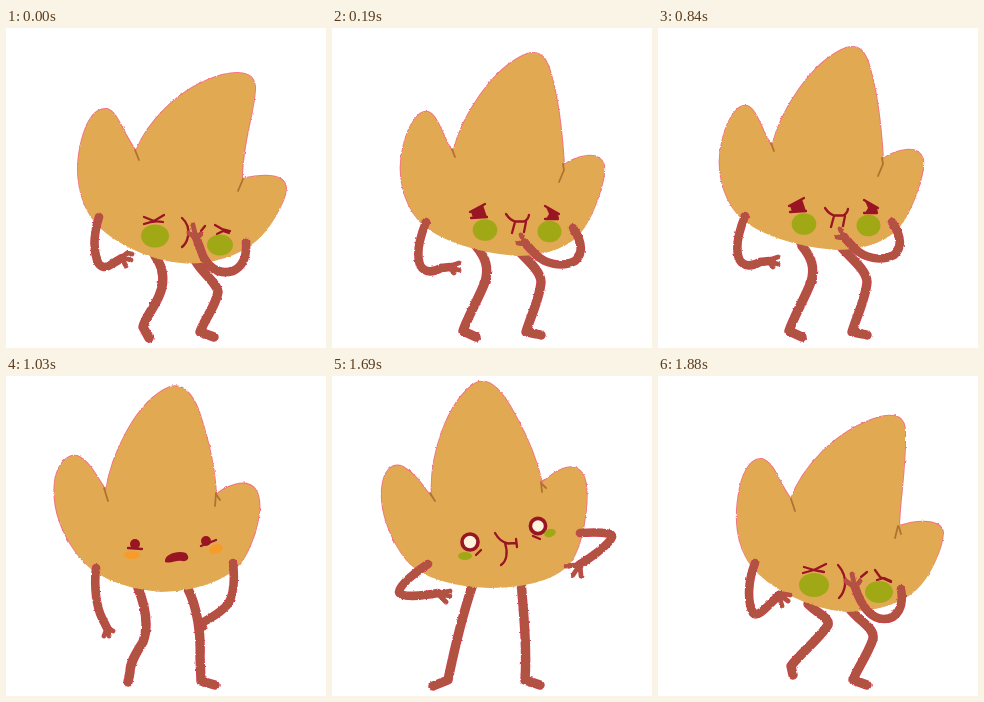
Write an HTML page that moves like this. It is 320x320 px and loops after 2070 ms.

```html
<!DOCTYPE html>
<html lang="en">
<head>
<meta charset="utf-8">
<title>Queasy leaf</title>
<style>
  html, body { margin: 0; width: 100%; height: 100%; overflow: hidden; background: #fff; }
  svg { display: block; width: 100vw; height: 100vh; }
  path { fill: none; stroke-linecap: round; stroke-linejoin: round; }
  .rim { stroke: url(#blush); stroke-width: 2; filter: url(#rough); }
  .skin { fill: #e2a953; }
  .crease { stroke: #b0722f; stroke-width: 1.8; }
  .limb { stroke-width: 6.6; stroke: #b05340; filter: url(#soft); }
  .limb.edge { stroke-width: 8.6; stroke: #c8434e; filter: url(#rough); }
  .leg { stroke-width: 7.4; stroke: #b05340; filter: url(#soft); }
  .leg.edge { stroke-width: 9.4; stroke: #c8434e; filter: url(#rough); }
  .hand { stroke-width: 3.4; stroke: #b05340; filter: url(#soft); }
  .hand.edge { stroke-width: 4.8; stroke: #c8434e; filter: url(#rough); }
  .ink { stroke: #991523; stroke-width: 2.3; }
  .blot { fill: #991523; }
  .ring { fill: #fdf3dd; stroke: #991523; stroke-width: 3.6; }
  .sick { fill: #a1a816; }
  .warm { fill: #f79c28; }

  .pose, .top { animation: 2070ms step-end infinite; }
  .pose { opacity: 0; }
  .squeeze { animation-name: squeeze; }
  .hold { animation-name: hold; }
  .hold .top { animation-name: sway; }
  .relief { animation-name: relief; }
  .calm { animation-name: calm; }
  .gag { animation-name: gag; }
  .heave { animation-name: heave; }
  @keyframes squeeze { 0% { opacity: 1 } 9.178%, 100% { opacity: 0 } }
  @keyframes hold { 0% { opacity: 0 } 9.178% { opacity: 1 } 49.758%, 100% { opacity: 0 } }
  @keyframes sway {
    0% { transform: translate(5px, 4px) }
    31.884% { transform: none }
    40.579%, 100% { transform: translate(-2px, -2px) }
  }
  @keyframes relief { 0% { opacity: 0 } 49.758% { opacity: 1 } 58.937%, 100% { opacity: 0 } }
  @keyframes calm { 0% { opacity: 0 } 58.937% { opacity: 1 } 81.642%, 100% { opacity: 0 } }
  @keyframes gag { 0% { opacity: 0 } 81.642% { opacity: 1 } 90.821%, 100% { opacity: 0 } }
  @keyframes heave { 0% { opacity: 0 } 90.821%, 100% { opacity: 1 } }
</style>
</head>
<body>
<svg id="stage" viewBox="0 0 320 320">
  <defs>
    <linearGradient id="blush" gradientUnits="userSpaceOnUse" x1="0" y1="165" x2="0" y2="200">
      <stop offset="0" stop-color="#f27680"/>
      <stop offset="1" stop-color="#e2a953"/>
    </linearGradient>
    <filter id="rough" filterUnits="userSpaceOnUse" x="0" y="0" width="320" height="320" color-interpolation-filters="sRGB">
      <feTurbulence type="fractalNoise" baseFrequency=".3" numOctaves="2" seed="4"/>
      <feDisplacementMap in="SourceGraphic" scale="2.4" xChannelSelector="R" yChannelSelector="G"/>
    </filter>
    <filter id="soft" filterUnits="userSpaceOnUse" x="0" y="0" width="320" height="320" color-interpolation-filters="sRGB">
      <feTurbulence type="fractalNoise" baseFrequency=".25" numOctaves="2" seed="9"/>
      <feDisplacementMap in="SourceGraphic" scale="1.8" xChannelSelector="R" yChannelSelector="G"/>
    </filter>
  </defs>
</svg>
<script>
const line = (cls, d) => `<path class="${cls}" d="${d}"/>`;
const oval = (cls, x, y, rx, ry = rx, turn = 0) =>
  `<ellipse class="${cls}" cx="${x}" cy="${y}" rx="${rx}" ry="${ry}" transform="rotate(${turn} ${x} ${y})"/>`;
const edged = (cls, d) => line(cls + ' edge', d) + line(cls, d);

const poses = {
  squeeze: {
    body: 'M130 123C140 98 170 60 216 47C238 42 250 46 249 62C247 90 236 115 236 151C262 145 280 147 280 161C279 175 262 202 250 212C232 228 205 235 180 234.5C140 232 100 210 85 188C70 165 69 135 77 108C83 88 92 80 101 81C112 84 118 108 130 123Z',
    crease: 'M129 122L133 132M237 151L232 163',
    legs: 'M149 228C158 240 159 255 153 268C148 280 139 290 137 299L143 310M189 232C196 245 211 255 212 264C210 278 199 290 194 304L208 309',
    arms: 'M93 189C88 205 87 220 91 232C94 241 100 240 106 236L116 230M240 214C241 228 238 238 227 243C212 247 203 240 197 228L190 209',
    hands: 'M116 229L121 225L126 226M117 230L125 232M116 231L120 238M190 209L187 197M189 210L183 205M191 210L195 206',
    face: line('ink', 'M138 189L148 193L158 187M138 196Q148 192 157 194M209 197L216 201L224 203M211 206L217 203L223 205M176 190Q184 197 182 208Q181 215 176 219M199 198L195 203')
      + oval('sick', 149, 208, 14, 11.5) + oval('sick', 214, 217, 13, 10.5)
  },
  hold: {
    body: 'M116 121C124 86 155 36 190 22C203 18 209 26 213 39C221 65 225 100 227 133C240 124 262 118 267 133C269 148 257 180 247 195C235 214 210 223 180 223C140 220 100 207 82 188C66 170 59 140 67 112C72 92 82 78 91 80C101 83 106 106 116 121Z',
    crease: 'M115 117L118 125M226 132L227 138L222 150',
    legs: 'M142 212L144 218C154 230 157 240 153 254C147 270 135 290 131 303L144 309M178 213L184 220C195 232 209 243 209 254C208 270 198 290 194 304L209 307',
    arms: 'M89 190C83 205 79 222 83 233C88 242 97 240 104 236L113 235M236 196C244 208 248 220 238 229C225 236 208 232 198 222L188 211',
    hands: 'M113 234L122 231M114 236L122 238M113 236L117 241M188 211L184 203M188 212L181 211',
    face: line('ink', 'M133 180L148 172M134 186L150 185M208 174L222 182M208 187L221 187')
      + line('blot', 'M134 180L146 173L150 185L136 186Z') + line('blot', 'M209 175L221 182L222 187L209 187L212 182Z')
      + line('ink', 'M169 182Q173 188 178 189.5L187 189.5Q191 188 192 183M178 190L175 201M189 190L187 200')
      + oval('sick', 148, 198, 12.3, 10.8) + oval('sick', 212.5, 199.5, 12, 10.8)
  },
  relief: {
    body: 'M100 115C105 80 130 25 164 11C180 6 190 25 195 42C204 70 209 95 210 119C220 110 240 102 249 113C258 125 252 155 240 178C228 201 195 214 155 215C115 212 85 198 70 176C55 155 46 130 49 105C52 87 62 78 71 80C83 84 92 103 100 115Z',
    crease: 'M98 112L102 125M210 117L209 130M210 118L214 124',
    legs: 'M132 212C140 232 143 250 137 266C128 280 124 288 124 296L122 306M181 211C192 232 195 260 194 280L195 305L209 309',
    arms: 'M90 192C88 210 90 230 96 242L101 252M227 187C229 205 227 220 222 228C214 238 202 243 196 247',
    hands: 'M101 252L98 260M102 253L103 260M102 252L107 255M197 247L199 252',
    face: oval('blot', 129, 168, 5) + oval('blot', 200, 165, 5)
      + line('ink', 'M122 172L136 173M195 170L210 164')
      + oval('warm', 126, 179, 8, 4) + oval('warm', 210, 173, 7, 4.5, -20)
      + line('blot', 'M159 186C158 178 172 174 180 177C185 182 181 186 176 185C170 184 165 188 159 186Z')
  },
  calm: {
    body: 'M94 118C95 81 120 26 149 9.5C165 3 180 25 188 45C197 70 203 95 204 117C212 106 233 94 242 104C251 115 245 155 235 180C225 200 190 212 145 212C110 211 80 200 63 180C45 160 38 130 44 103C47 88 53 83 61 84C75 89 85 105 94 118Z',
    crease: 'M92 113L97 124M204 112L204 125M204 118L207 117',
    legs: 'M130 210C120 235 116 270 114 306L100 311M178 206C190 235 194 270 194 302L209 310',
    arms: 'M91 190C89 215 88 235 86 258M213 194C215 215 219 235 218 254',
    hands: 'M85 258L80 266M86 259L85 268M87 258L90 266M217 254L214 261M218 255L219 262M219 254L222 260',
    face: oval('blot', 126, 168, 6) + oval('blot', 196, 160, 5.5)
      + oval('warm', 123, 179, 7, 3.2) + oval('warm', 204, 168, 6, 3.2, -20)
      + line('ink', 'M153 183C162 181 172 180 180 177')
  },
  gag: {
    body: 'M100 122C97 81 115 26 143 7.5C158 -1 172 18 183 39C196 62 205 85 210 107C222 96 240 84 250 97C260 112 252 160 243 178C233 200 200 211 158 211C122 210 90 201 75 184C57 162 46 130 51 106C54 92 62 87 71 91C84 98 92 112 100 122Z',
    crease: 'M98 117L103 125M209 106L210 116M210 108L214 112',
    legs: 'M141 208C130 240 122 275 116 304L101 310M189 205C192 240 195 275 193 304L208 309',
    arms: 'M96 188C85 195 68 208 67 216C68 222 90 220 106 217M248 157C262 156 282 156 280 161C276 170 258 182 247 189',
    hands: 'M107 217L118 215M107 218L118 220M107 219L114 226M246 189L234 190M247 190L241 199M248 189L249 200',
    face: oval('ring', 138, 166, 8) + oval('ring', 206, 150, 7.6)
      + line('ink', 'M144 179L149 174M201 160L208 163M163 157Q168 166 176 167.5L184 167M184 163L185 171M173 167C176 176 175 185 169 189')
      + oval('sick', 133, 180, 7, 4) + oval('sick', 218, 157, 6, 4, -20)
  },
  heave: {
    body: 'M133 123C143 95 175 55 222 41C240 37 247 42 247 56C248 90 242 120 241 150C262 143 284 144 285 157C284 175 270 202 258 213C240 230 210 235 188 235C150 232 110 210 94 190C78 168 76 140 82 112C86 92 95 82 104 83C117 87 121 108 133 123Z',
    crease: 'M133 123L137 135M240 150L237 162M241 151L243 158',
    legs: 'M150 228C160 238 172 242 170 249C162 262 140 280 133 290L135 299M191 232C202 246 217 252 215 263C209 280 198 295 195 304L209 309',
    arms: 'M97 187C90 205 89 225 95 237C99 242 108 232 116 224L121 219M243 213C246 230 240 243 226 243C213 243 203 230 197 211',
    hands: 'M121 217L132 219M122 219L130 225M121 220L124 230M197 211L194 198M196 211L188 205M198 211L202 205',
    face: line('ink', 'M146 191L156 194L168 188M145 197L156 194L166 196M217 194L222 201L233 206M219 204L226 202L233 205M180 189Q188 198 187 209Q186 217 181 222M209 196L203 201')
      + oval('sick', 156, 209, 15, 12) + oval('sick', 221, 216, 14, 11)
  }
};

const draw = ([name, p]) => `<g class="pose ${name}">
  ${edged('leg', p.legs)}
  <g class="top">
    ${line('rim', p.body)}${line('skin', p.body)}${line('crease', p.crease)}${p.face}
    ${edged('limb', p.arms)}${edged('hand', p.hands)}
  </g></g>`;

document.getElementById('stage').insertAdjacentHTML('beforeend', Object.entries(poses).map(draw).join(''));
</script>
</body>
</html>
```
